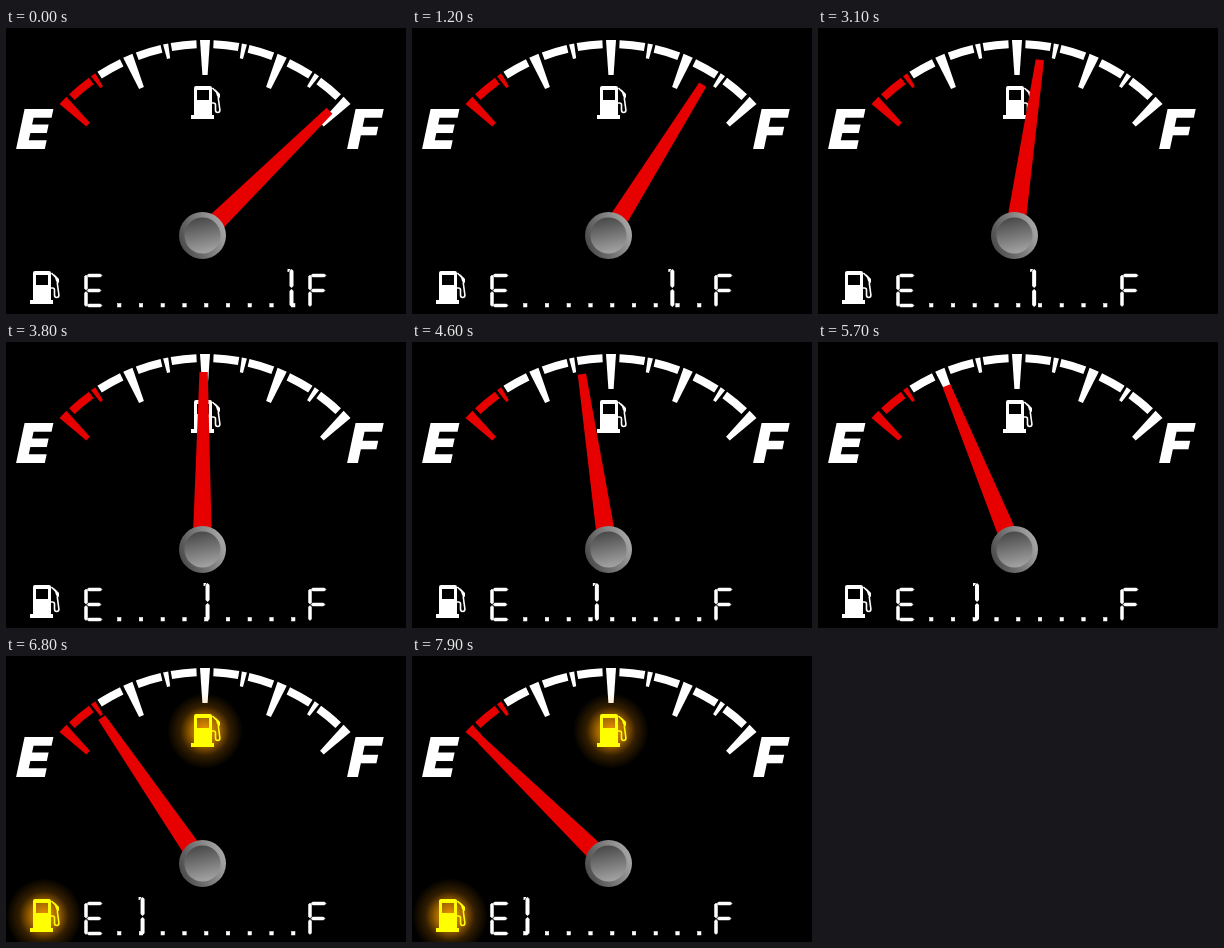
Recreate the animation shown at these times as an HTML page. Size 400 by 286 pixels, loop 8000 ms.

```html
<!DOCTYPE html>
<html lang="en">
<head>
<meta charset="utf-8">
<title>Fuel gauge</title>
<style>
  html, body { margin: 0; width: 100%; height: 100%; overflow: hidden; background: #000; }
  svg { display: block; width: 100vw; height: 100vh; }
  text { font: 900 55px Inter, "Open Sans", sans-serif; }
  .body { fill: #fff; stroke: #fff; }
  .halo { visibility: hidden; }
  .lit .halo { visibility: visible; }
  .lit .body { fill: #ff0; stroke: #ff0; }
</style>
</head>
<body>
<svg id="stage" viewBox="0 0 400 286" fill="#fff">
  <defs>
    <linearGradient id="rim" x1="0" y1="0.7" x2="1" y2="0.3">
      <stop offset="0" stop-color="#484848"/><stop offset="1" stop-color="#aaa"/>
    </linearGradient>
    <linearGradient id="cap" x1="0.4" y1="0" x2="0.6" y2="1">
      <stop offset="0" stop-color="#484848"/><stop offset="1" stop-color="#a4a4a4"/>
    </linearGradient>
    <radialGradient id="glow">
      <stop offset="0" stop-color="#ffa000" stop-opacity=".95"/>
      <stop offset=".35" stop-color="#ffa000" stop-opacity=".65"/>
      <stop offset=".65" stop-color="#ff9800" stop-opacity=".2"/>
      <stop offset="1" stop-color="#ff9800" stop-opacity="0"/>
    </radialGradient>
    <g id="pump">
      <path stroke="none" fill-rule="evenodd" d="M188 60q0-2 2-2h14q2 0 2 2v27h2v4h-23v-4h3zM191 62v10h12v-10z"/>
      <path fill="none" stroke-width="1.600" d="M206 75h1.500q2 0 2 2v5q0 2.500 2.200 2.500t2.200-2.500l-1.500-11v-5l-6-6"/>
      <path stroke="none" d="M209 61l5 5v4l-3-2z"/>
    </g>
  </defs>
  <g id="dial"></g>
  <text transform="translate(7.500 121) skewX(-12)">E</text>
  <text transform="translate(338.500 121) skewX(-12)">F</text>
  <circle class="halo" cx="199" cy="75" r="38" fill="url(#glow)"/>
  <circle class="halo" cx="38" cy="260" r="38" fill="url(#glow)"/>
  <use href="#pump" class="body"/>
  <use href="#pump" class="body" x="-161" y="185"/>
  <g id="readout" stroke="#fff" stroke-width=".5"></g>
  <path id="one" d="M-2 243l2-2 2 2v15l-2 2-2-2zM-2 263l2-2 2 2v14l-2 2-2-2zM-4 241h3l-2 3h-1z"/>
  <path id="needle" fill="#e60000" d="M-10-18L-4.500-178H3.800L8.500-18z"/>
  <circle cx="196.500" cy="207.500" r="23.500" fill="url(#rim)"/>
  <circle cx="196.500" cy="207.500" r="18" fill="url(#cap)"/>
</svg>
<script>
const $ = id => document.getElementById(id);
const RED = '#e60000', STEP = 23, CX = 199, CY = 209.5, OUTER = 197.5, MIDDLE = OUTER - 4;

function polar(r, deg) {
  const a = deg * Math.PI / 180;
  return `${CX + r * Math.sin(a)} ${CY - r * Math.cos(a)}`;
}

function tick(deg, length, wide, narrow) {
  const color = deg < -30 ? RED : '#fff';
  return `<path fill="${color}" transform="translate(${CX} ${CY}) rotate(${deg})"
    d="M${-wide} ${-OUTER}H${wide}L${narrow} ${length - OUTER}H${-narrow}z"/>`;
}

function band(from, to) {
  const color = to < -30 ? RED : '#fff';
  return `<path fill="none" stroke="${color}" stroke-width="8"
    d="M${polar(MIDDLE, from)}A${MIDDLE} ${MIDDLE} 0 0 1 ${polar(MIDDLE, to)}"/>`;
}

let dial = '';
for (let k = -2; k <= 2; k++) {
  const deg = k * STEP, mid = deg + STEP / 2, end = deg + STEP;
  dial += tick(deg, 35, 5, 2.6);
  if (k < 2) dial += tick(mid, 15, 2.6, 1.6) + band(deg + 2.5, mid - 1.5) + band(mid + 1.5, end - 2.5);
}
$('dial').innerHTML = dial;

// Segment letters and the fixed row of dots
const bar = (x, y, w) => `<path d="M${x} ${y}l1.500-1.500h${w - 3}l1.500 1.500-1.500 1.500h${3 - w}z"/>`;
const post = (x, y) => `<path d="M${x} ${y}l1.500 1.500v12l-1.500 1.500-1.500-1.500v-12z"/>`;
const letter = x => post(x, 247) + post(x, 263.5) + bar(x + 1, 247.5, 15) + bar(x + 1, 262.5, 14);
let readout = letter(80) + bar(81, 277.5, 15) + letter(304);
for (let i = 0; i < 9; i++) readout += `<rect x="${111.5 + i * 21.75}" y="275.5" width="3.500" height="3.500"/>`;
$('readout').innerHTML = readout;

// Fuel used at each step of a tenth of a second
const used = [[0, 0], [9, .104], [12, .148], [18, .22], [27, .346], [31, .408],
  [46, .592], [57, .744], [68, .876], [79, 1]];

function usedAt(n) {
  const i = Math.max(1, used.findIndex(p => p[0] >= n));
  const [a, u] = used[i - 1], [b, v] = used[i];
  return u + (v - u) * (n - a) / (b - a);
}

function draw(now) {
  const n = Math.floor(now % 8000 / 100), u = usedAt(n);
  $('needle').setAttribute('transform', `translate(197 208) rotate(${45.4 - 91.3 * u})`);
  $('one').setAttribute('transform', `translate(${285.5 - 170 * u} 0)`);
  $('stage').classList.toggle('lit', n >= 66);
}

const start = performance.now();
function loop() {
  draw(performance.now() - start);
  requestAnimationFrame(loop);
}
loop();
</script>
</body>
</html>
```
